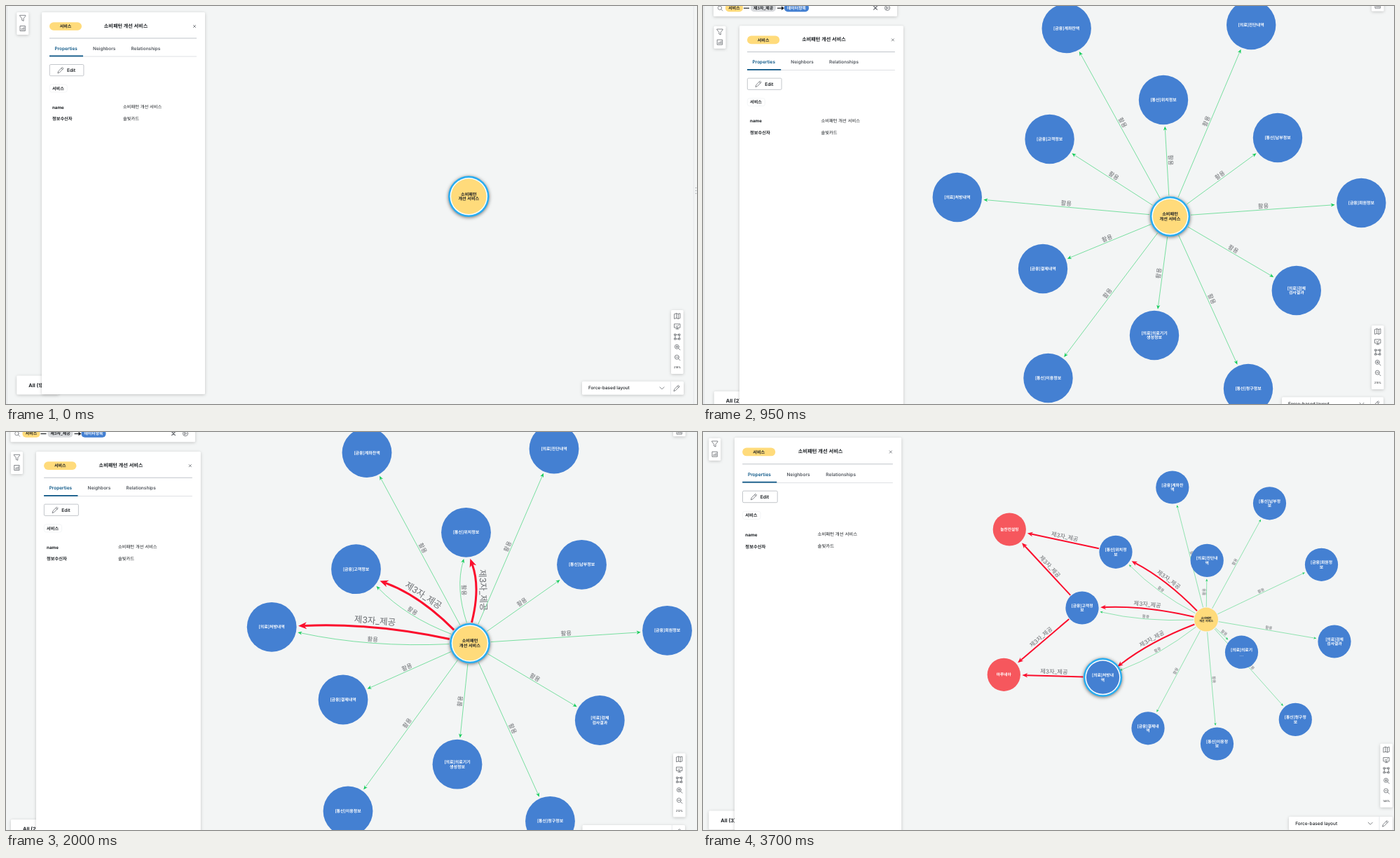
These frames come from a looping animation (986 px wide and 568 px high, 4500 ms). An HTML page:

```html
<!DOCTYPE html>
<html lang="ko">
<head>
<meta charset="utf-8">
<title>Graph exploration</title>
<style>
html, body { margin: 0; width: 100%; height: 100%; overflow: hidden; background: #f3f5f5; }
svg { display: block; width: 986px; height: 568px; font-family: Inter, "Noto Sans CJK KR", "Noto Sans CJK", sans-serif; text-rendering: geometricPrecision; }
.card { fill: #fff; filter: drop-shadow(0 1px 2px #0003); }
.icon { fill: none; stroke: #5b5f65; stroke-width: .75; stroke-linejoin: round; stroke-linecap: round; }
.glow { filter: drop-shadow(0 1px 2.5px #0008); }
</style>
</head>
<body>
<svg id="stage" viewBox="0 0 986 568"></svg>
<script>
const BLUE = '#4480d2', YELLOW = '#ffdb7b', RED = '#f6575d', DARK = '#1b1f23';

const icons = {
  filter: 'M-4-4H4V-3L1.2 .5V4L-1.2 3V.5L-4-3Z',
  chart: 'M-3.5-3.5H3.5V3.5H-3.5ZM-1.8 2V.5M0 2V-.5M1.8 2V-1.5',
  map: 'M-4-3L-1.3-3.8L1.3-3L4-3.8V3L1.3 3.8L-1.3 3L-4 3.8ZM-1.3-3.8V3M1.3-3V3.8',
  board: 'M-4-3.5H4V1.8H-4ZM0 1.8V3.6M-2 3.6H2M-2-1L-.4 .2L2-2.2',
  fit: 'M-4-4H-2V-2H-4ZM2-4H4V-2H2ZM-4 2H-2V4H-4ZM2 2H4V4H2ZM-2-3H2M-2 3H2M-3-2V2M3-2V2',
  search: 'M2.4-.6A3 3 0 1 1-3.6-.6A3 3 0 1 1 2.4-.6M1.6 1.5L4 4',
  pencil: 'M-4 4L-3.2 1.4L2.3-4L4-2.3L-1.4 3.2ZM1-2.7L2.7-1',
  close: 'M-1.6-1.6L1.6 1.6M-1.6 1.6L1.6-1.6',
  chevron: 'M-3-1.5L0 1.5L3-1.5',
  play: 'M3.6 0A3.6 3.6 0 1 1-3.6 0A3.6 3.6 0 1 1 3.6 0M-1-1.6L1.6 0L-1 1.6Z'
};
icons.zoomOut = icons.search + 'M-2-.6H.8';
icons.zoomIn = icons.zoomOut + 'M-.6-2V.8';

const at = (x, y, body, extra = '') => `<g transform="translate(${x} ${y})${extra}">${body}</g>`;
const icon = (name, x, y, s = 1) => at(x, y, `<path class="icon" d="${icons[name]}"/>`, ` scale(${s})`);
const box = (x, y, w, h, attrs = 'class="card"', r = 1.5) =>
  `<rect x="${x}" y="${y}" width="${w}" height="${h}" rx="${r}" ${attrs}/>`;
const line = (x1, y1, x2, y2, color, w = 1) =>
  `<path d="M${x1} ${y1}L${x2} ${y2}" stroke="${color}" stroke-width="${w}"/>`;
const text = (s, x, y, size, { weight = 400, fill = DARK, anchor = 'start' } = {}) =>
  `<text x="${x}" y="${y}" dy=".36em" font-size="${size}" font-weight="${weight}" fill="${fill}" text-anchor="${anchor}">${s}</text>`;
const mid = { anchor: 'middle' }, bold = { weight: 700 }, semi = { weight: 600 };

function panel({ x, y, s, h }) {
  const tab = { ...semi, fill: '#53585f' };
  return at(x, y,
    box(0, 0, 233, h) +
    box(11, 14.2, 46, 11.6, `fill="${YELLOW}"`, 5.8) +
    text('서비스', 34, 20, 6, { ...mid, ...bold }) +
    text('소비패턴 개선 서비스', 120, 19.4, 7.1, { ...mid, ...semi }) +
    icon('close', 218, 20) +
    line(11, 37, 221, 37, '#bfc4ca') +
    text('Properties', 18.5, 51.5, 6.45, { ...semi, fill: '#0b5686' }) +
    text('Neighbors', 73, 51.5, 6.45, tab) +
    text('Relationships', 127.5, 51.5, 6.45, tab) +
    line(11, 63, 221, 63, '#dfe1e4') +
    line(11, 62.3, 59, 62.3, '#0b5686', 1.8) +
    box(11.3, 74.5, 48.6, 16.2, 'fill="#fff" stroke="#b5b9bf" stroke-width=".8"') +
    icon('pencil', 27, 82.5) +
    text('Edit', 36, 82.5, 6.6, semi) +
    box(11.3, 103, 25, 11, 'fill="#fff" stroke="#eceef0" stroke-width=".6"', 3) +
    text('서비스', 15, 108.5, 6.1, semi) +
    text('name', 15, 135.3, 6.2, bold) +
    text('소비패턴 개선 서비스', 116, 134.8, 6.25) +
    text('정보수신자', 15, 152, 6.2, bold) +
    text('솔빛카드', 116, 151.6, 6.25), ` scale(${s})`);
}

const leftTools = ([x, y]) => box(x, y, 17, 32) + icon('filter', x + 8.6, y + 8.3) + icon('chart', x + 8.6, y + 23);

const rightTools = ([x, y], zoom) => box(x, y, 17.6, 91) +
  ['map', 'board', 'fit', 'zoomIn', 'zoomOut'].map((n, i) => icon(n, x + 8.9, y + 8.5 + i * 14.8)).join('') +
  text(zoom, x + 8.9, y + 82, 3.8, mid);

const layoutBar = ([x, y], s) => at(x, y,
  box(0, 0, 145, 19) + text('Force-based layout', 9, 9.4, 6.35, { weight: 500 }) +
  icon('chevron', 114, 9.5) + line(126.5, 0, 126.5, 19, '#e6e8ea') + icon('pencil', 135, 9.5), ` scale(${s})`);

const countBar = ([x, y], n) => box(x, y, 60, 27) + text(`All (${n})`, x + 17, y + 13.6, 7.3, bold);

function searchBar([x, bottom], w) {
  const y = bottom - 12;
  const pill = (dx, pw, fill, s, color) => box(x + dx, y - 5.5, pw, 11, `fill="${fill}"`, 5) +
    text(s, x + dx + pw / 2, y, 5.9, { ...mid, ...semi, fill: color });
  return box(x, -10, w, bottom + 10) +
    icon('search', x + 9.5, y + .5, .9) +
    line(x + 43, y + .3, x + 51, y + .3, DARK, 1.2) +
    line(x + 91, y + .3, x + 98, y + .3, DARK, 1.2) +
    `<path d="M${x + 97} ${y - 2.5}l4 2.8l-4 2.8z" fill="${DARK}"/>` +
    pill(17, 25, YELLOW, '서비스', DARK) +
    pill(53, 36, '#d9dbde', '제3자_제공', DARK) +
    pill(101, 35, BLUE, '데이터항목', '#fff') +
    icon('close', x + w - 31, y, 1.5) + icon('play', x + w - 14, y);
}

function node([x, y], r, fill, lines, size, selected) {
  const color = fill === YELLOW ? DARK : '#fff';
  const ring = selected
    ? `<circle class="glow" r="${r + 4}" fill="#29adf0"/><circle r="${r + 1.5}" fill="#fff"/>` : '';
  return at(x, y, ring + `<circle r="${r}" fill="${fill}"/>` + lines.map((s, i) =>
    text(s, 0, (i - (lines.length - 1) / 2) * size * 1.12, size, { ...mid, ...semi, fill: color })).join(''));
}

// bend: 0 straight, 1 bows clockwise, -1 counter-clockwise
function edge(p, q, r0, r1, k, strong, bend = 0) {
  const [color, w, head, size, name] = strong
    ? ['#fb0d2c', 3, 12, 12.5, '제3자_제공'] : ['#12cc58', .55, 6, 8.4, '활용'];
  const dir = Math.atan2(q[1] - p[1], q[0] - p[0]);
  const polar = (o, r, a) => [o[0] + r * Math.cos(a), o[1] + r * Math.sin(a)];
  const a = polar(p, r0, dir + bend * .12);
  const b = polar(q, r1 + 2.5, dir + Math.PI - bend * .12);
  const c = polar([(p[0] + q[0]) / 2, (p[1] + q[1]) / 2], 18 * k * bend, dir + Math.PI / 2);
  const tip = Math.atan2(b[1] - c[1], b[0] - c[0]), h = head * k;
  const neck = polar(b, -h * .7, tip);
  // the label sits over the middle of the shaft and never upside down
  const rot = Math.atan(Math.tan(dir));
  const [mx, my] = [0, 1].map(i => (a[i] + neck[i]) / 4 + c[i] / 2);
  const off = size * k * (strong ? .78 : .65);
  return `<path d="M${a}Q${c} ${neck}" fill="none" stroke="${color}" stroke-width="${w * (strong ? k : Math.sqrt(k))}"/>` +
    `<path d="M${b}L${polar(b, -h * 1.08, tip + .4)}L${neck}L${polar(b, -h * 1.08, tip - .4)}Z" fill="${color}"/>` +
    at(mx + off * Math.sin(rot), my - off * Math.cos(rot),
      text(name, 0, 0, size * k, { ...mid, fill: '#6b6e72' }), ` rotate(${rot * 180 / Math.PI})`);
}

const items = ['[금융]계좌잔액', '[의료]진단내역', '[통신]위치정보', '[통신]납부정보', '[금융]고객정보', '[의료]처방내역',
  '[금융]회원정보', '[금융]결제내역', '[의료]검체 검사결과', '[의료]의료기기 생성정보', '[통신]이용정보', '[통신]청구정보'];
const shared = [2, 4, 5];

function itemLines(name, small) {
  const lines = name.split(' ');
  if (!small || lines[0].length <= 7) return lines;
  return [lines[0].slice(0, 7), lines[1] ? '...' : lines[0].slice(7)];
}

function graph({ hub, hubR, places = [], r, k = 1, strong, firms = [], selected = -1 }) {
  const hubOn = selected < 0;
  let edges = '', nodes = '';
  places.forEach((p, i) => {
    const both = strong && shared.includes(i), r0 = hubR + (hubOn ? 5 : 1);
    edges += edge(hub, p, r0, r, k, false, both ? -1 : 0);
    if (both) edges += edge(hub, p, r0, r, k, true, 1);
    nodes += node(p, r, BLUE, itemLines(items[i], k < 1), k < 1 ? 5.8 : 5.95, i === selected);
  });
  firms.forEach(({ pos, name, from }) => {
    for (const i of from) edges += edge(places[i], pos, r + (i === selected ? 4.5 : 1), r, k, true);
    nodes += node(pos, r, RED, [name], 5.7);
  });
  return edges + nodes + node(hub, hubR, YELLOW, ['소비패턴', '개선 서비스'], k < 1 ? 4.1 : 6.15, hubOn);
}

const scenes = [
  {
    until: 500, panel: { x: 51, y: 9, s: 1, h: 545 }, left: [15.3, 9], right: [949, 434], zoom: '218%',
    layout: [822, 535.8], count: [15.3, 527.5], n: 1, edgeLine: true, grip: true,
    graph: { hub: [660.3, 271.8], hubR: 25.2 }
  },
  {
    until: 1250, panel: { x: 52, y: 28.3, s: 1.004, h: 560 }, left: [15.5, 28.7], right: [954, 456], zoom: '215%',
    layout: [826, 558.3], count: [15.8, 550], n: 2, edgeLine: true, search: [15, 14.8], searchW: 262, corner: [954, 7.5],
    graph: {
      hub: [666.5, 300.3], hubR: 24.6, r: 35.2,
      places: [[518.7, 32], [782.2, 27], [657, 134], [820, 188], [494.6, 190], [362.8, 273], [939.3, 281],
        [485, 375], [846.8, 406], [644, 470], [492.5, 531], [778, 546]]
    }
  },
  {
    until: 2500, panel: { x: 43, y: 28, s: 1.008, h: 560 }, left: [7, 28], right: [952, 458.4], zoom: '212%',
    layout: [822.5, 561], s: 1.01, count: [7, 553], n: 2, search: [6.5, 14.2], searchW: 263.5, corner: [952, 6.2],
    graph: {
      hub: [662, 301.5], hubR: 24.8, r: 35.4, strong: true,
      places: [[515, 29.5], [782, 24], [656.5, 143.3], [821.5, 189.3], [499.5, 195.7], [379.2, 278.3], [943.5, 283.3],
        [481, 382], [847.3, 411.5], [644, 474.2], [488, 541], [776.5, 555.3]]
    }
  },
  {
    until: 4500, panel: { x: 45, y: 8, s: 1.022, h: 560 }, left: [8.3, 8.7], right: [966.3, 444.8], zoom: '146%',
    layout: [836, 549], s: 1.02, count: [8.3, 540.4], n: 3,
    graph: {
      hub: [718, 267.6], hubR: 17, r: 23.6, k: .66, strong: true, selected: 5,
      places: [[669.8, 79], [719.2, 183.4], [589, 171.3], [808.5, 101.8], [541, 251], [570.5, 350.2], [882.5, 189.3],
        [635, 422.8], [901, 299], [768.5, 314.2], [733.5, 445], [845.3, 410.4]],
      firms: [{ pos: [437.3, 139], name: '늘찬컨설팅', from: [2, 4] }, { pos: [429.3, 346.3], name: '마루네아', from: [4, 5] }]
    }
  }
];

function render(s) {
  let out = s.edgeLine ? line(1.2, 0, 1.2, 568, '#dcdfe1') : '';
  if (s.grip) out += line(981.3, 0, 981.3, 568, '#e4e7e8') +
    [259.5, 263.5, 267.5].map(y => `<circle cx="984.5" cy="${y}" r=".8" fill="#a5a9ad"/>`).join('');
  out += graph(s.graph) + leftTools(s.left) + countBar(s.count, s.n) + panel(s.panel);
  if (s.search) out += searchBar(s.search, s.searchW);
  if (s.corner) out += box(s.corner[0], -10, 17.6, s.corner[1] + 10) + icon('chart', s.corner[0] + 8.9, -.4);
  return out + rightTools(s.right, s.zoom) + layoutBar(s.layout, s.s || 1);
}

const stage = document.getElementById('stage');
stage.innerHTML = scenes.map(s => `<g display="none">${render(s)}</g>`).join('');
const layers = [...stage.children];

function tick() {
  const t = performance.now() % 4500;
  const now = scenes.findIndex(s => t < s.until);
  layers.forEach((g, i) => g.setAttribute('display', i === now ? 'inline' : 'none'));
  requestAnimationFrame(tick);
}
tick();
</script>
</body>
</html>
```
